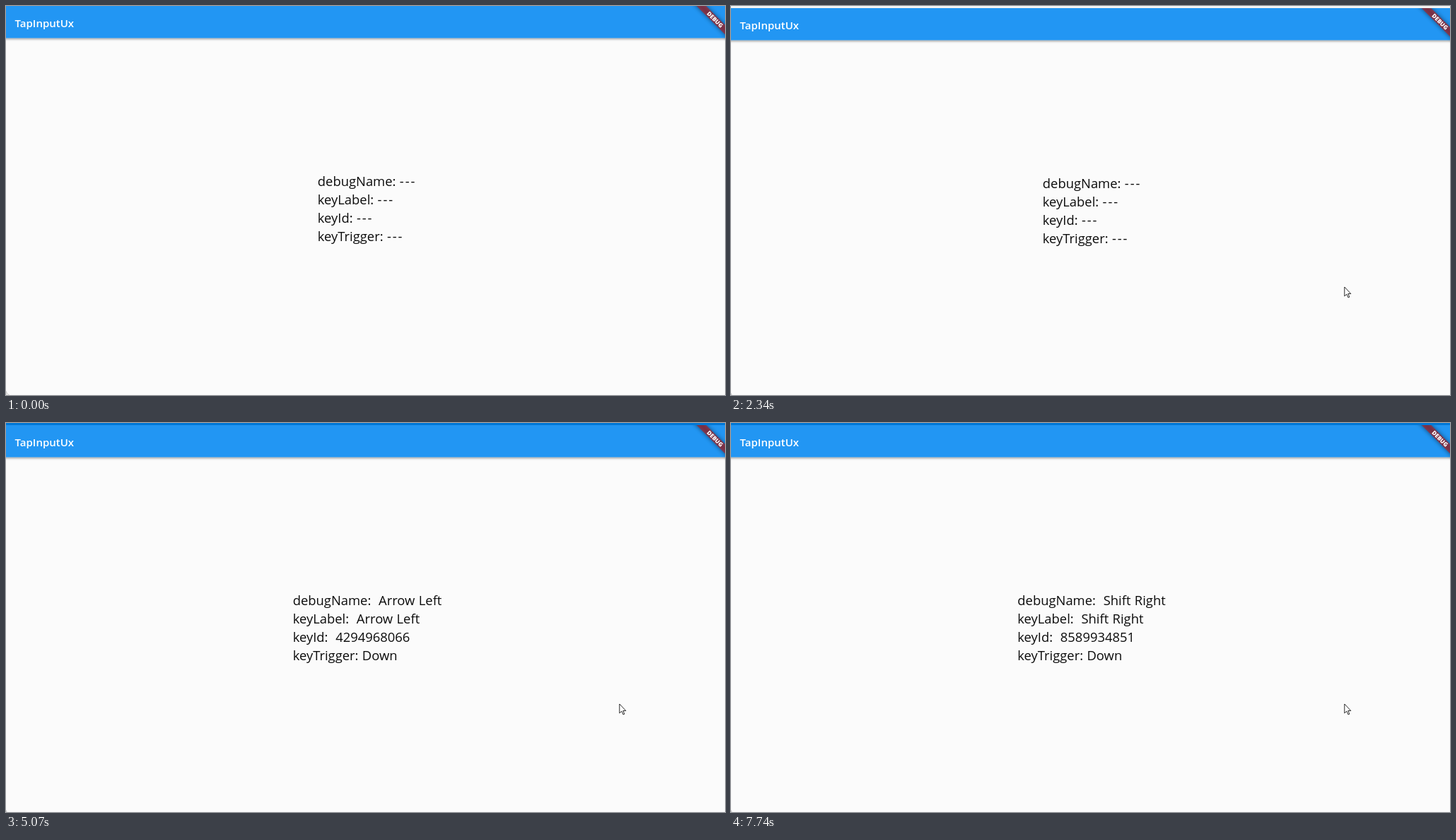
An HTML page for the animation above (8000 ms loop, 1017 px wide and 551 px high).

```html
<!DOCTYPE html>
<html lang="en">
<head>
<meta charset="utf-8">
<title>Key events</title>
<style>
  html, body { margin: 0; width: 100%; height: 100%; overflow: hidden; background: #fbfbfb; }
  svg { display: block; }
  text { font-family: "Open Sans", "Noto Sans", sans-serif; white-space: pre; }
  #lines text { font-size: 18.4px; word-spacing: .6px; fill: #0c0c0c; }
  .dash { letter-spacing: 1.9px; }
  .title { font-size: 15px; font-weight: 600; fill: #fff; }
  .banner { font-size: 8.2px; font-weight: 800; fill: #fff; text-anchor: middle; }
</style>
</head>
<body>
<svg width="1017" height="551" viewBox="0 0 1017 551">
  <defs>
    <filter id="barShadow" x="-5%" y="-30%" width="110%" height="180%">
      <feDropShadow dx="0" dy="1.5" stdDeviation="1.6" flood-opacity=".42"/>
    </filter>
    <filter id="blur" x="-30%" y="-150%" width="160%" height="400%">
      <feGaussianBlur stdDeviation="3"/>
    </filter>
  </defs>
  <rect width="1017" height="551" fill="#fbfbfb"/>
  <g id="app">
    <rect x="-10" y="-10" width="1040" height="55.3" fill="#2196f3" filter="url(#barShadow)"/>
    <text class="title" x="12.5" y="30">TapInputUx</text>
    <g transform="translate(1022 0) rotate(45)">
      <rect x="-40" y="22.4" width="80" height="9.6" opacity=".5" filter="url(#blur)"/>
      <rect x="-40" y="22.4" width="80" height="9.6" fill="#b71c1c" opacity=".627"/>
      <text class="banner" y="30.1">DEBUG</text>
    </g>
    <g id="lines">
      <text y="255"></text>
      <text y="281"></text>
      <text y="307"></text>
      <text y="333"></text>
    </g>
    <path d="M0 545.5Q1 550 5.5 551.5H0Z" fill="#eee" stroke="#c4c4c4" stroke-width=".8"/>
    <path id="cursor" d="M.8 1V14L3.8 11.2L6 16L7.8 15.2L5.8 10.6H9.8Z"
          fill="#fff" stroke="#111" stroke-width=".9"/>
  </g>
  <rect id="strip" width="1017"/>
</svg>
<script>
const LOOP = 8000;
const $ = id => document.getElementById(id);
const labels = ['debugName', 'keyLabel', 'keyId', 'keyTrigger'];
const rows = $('lines').children;

const key = (x, name, id) => ({ x, name, id });
const up = key(409.5, 'Arrow Up', 4294968068);
const left = key(405.7, 'Arrow Left', 4294968066);
const right = key(398.7, 'Arrow Right', 4294968067);
const down = key(396.4, 'Arrow Down', 4294968065);
const shift = key(405.3, 'Shift Right', 8589934851);

// Each entry starts at its first value, in ms
const events = [
  [0, key(440.8)],
  [4540, up, 'Down'],
  [5070, left, 'Down'], [5270, left, 'Up'],
  [5470, right, 'Down'], [5600, right, 'Up'],
  [5800, down, 'Down'], [6280, down, 'Up'],
  [6350, left, 'Down'], [6550, left, 'Up'],
  [7740, shift, 'Down']
];
const shifts = [[0, 0], [2010, 1], [2270, 2], [2340, 3]];
const pointer = [[0, 977, 600], [480, 977, 537], [550, 928, 474], [620, 884, 414], [690, 867, 394]];
const stripColors = [[0, '#f3f3f3'], [3550, '#a2caea'], [3615, '#51a1e0'], [3680, '#0078d7']];

const at = (list, t) => list.findLast(entry => entry[0] <= t);
let shown;

function showEvent(event) {
  if (event === shown) return;
  shown = event;
  const [, { x, name, id }, trigger] = event;
  const values = [name, name, id].map(v => '  ' + v).concat(' ' + trigger);
  labels.forEach((label, i) => {
    rows[i].setAttribute('x', x);
    rows[i].innerHTML = label + ':' + (name ? values[i] : ' <tspan class="dash">---</tspan>');
  });
}

function draw(now) {
  const t = now % LOOP;
  const [, dy] = at(shifts, t);
  const [, x, y] = at(pointer, t);
  $('app').setAttribute('transform', `translate(0 ${dy})`);
  $('cursor').setAttribute('transform', `translate(${x} ${y})`);
  $('strip').setAttribute('height', dy);
  $('strip').setAttribute('fill', at(stripColors, t)[1]);
  showEvent(at(events, t));
  requestAnimationFrame(draw);
}
draw(0);
</script>
</body>
</html>
```
